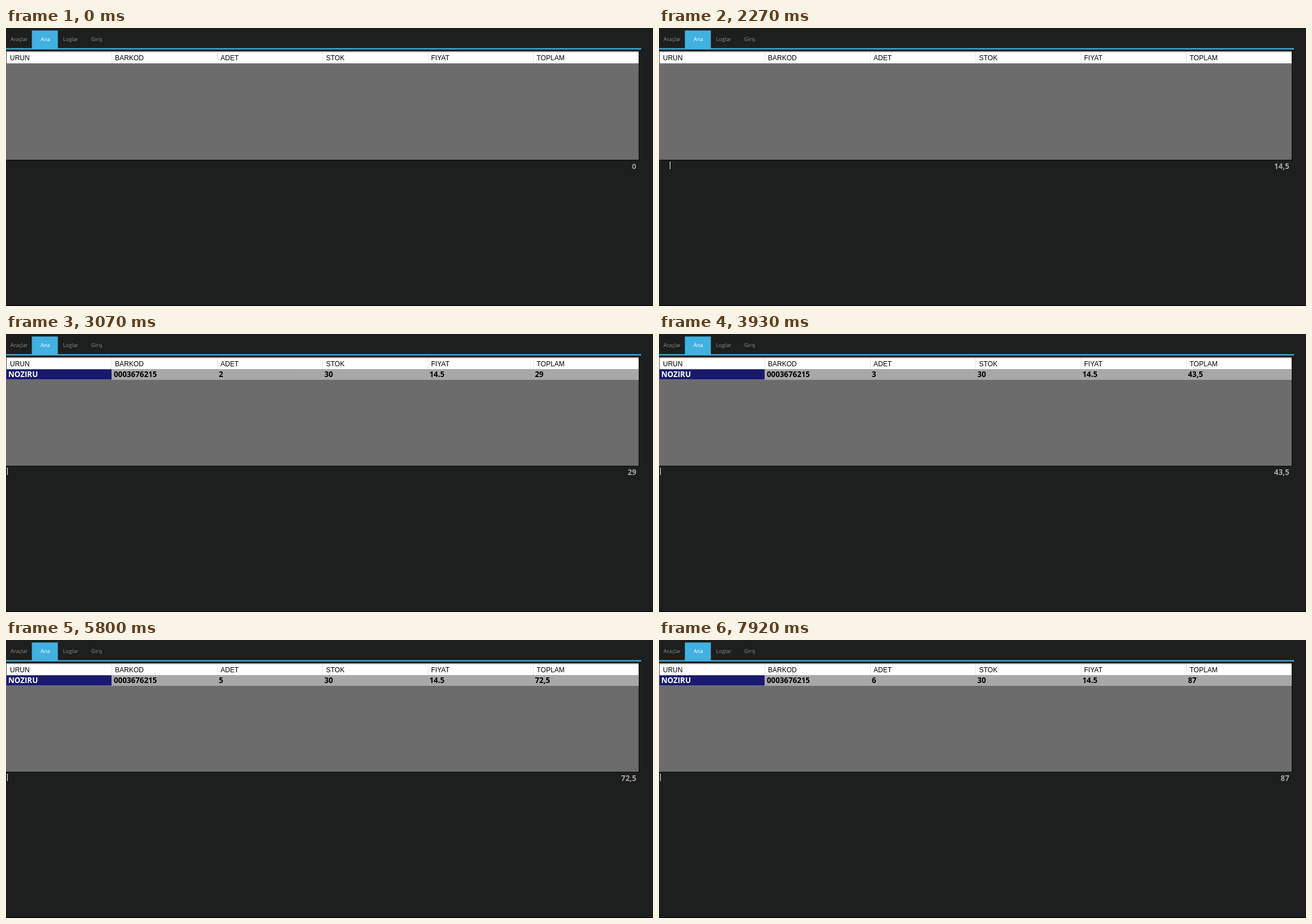
Animation of 1140x491 px, one loop 8000 ms. Source, as an HTML page:

```html
<!DOCTYPE html>
<html lang="tr">
<head>
<meta charset="utf-8">
<title>Satış ekranı</title>
<style>
  html, body { margin: 0; width: 100%; height: 100%; overflow: hidden; background: #1d1f1e; }
  svg { display: block; width: 1140px; height: 491px; }
  text { white-space: pre; font-kerning: none; }
  .tab { font: 9.3px "Open Sans", "Noto Sans", sans-serif; fill: #8c8c8c; }
  .tab.on { fill: #fff; }
  .head { font: 12px "Liberation Sans", Arial, sans-serif; fill: #000; }
  .cell { font: bold 13.3px "Open Sans", "Noto Sans", sans-serif; fill: #000; }
  .cell.on { fill: #fff; }
  .sum { font: bold 13.3px "Open Sans", "Noto Sans", sans-serif; fill: #a6a6a6; text-anchor: end; }
  .sum.zero { font-family: "Liberation Sans", Arial, sans-serif; }
</style>
</head>
<body>
<svg id="stage" viewBox="0 0 1140 491"></svg>
<script>
const LOOP = 8000;
const PRICE = 14.5;
const PITCH = 185.6;
const BLINK = 530;
const FRAME = 66;
const stage = document.getElementById("stage");

function add(tag, attrs, parent = stage) {
  const el = document.createElementNS("http://www.w3.org/2000/svg", tag);
  for (const key in attrs) el.setAttribute(key, attrs[key]);
  return parent.appendChild(el);
}
const rect = (x, y, width, height, fill, parent) => add("rect", { x, y, width, height, fill }, parent);
function label(text, x, y, cls, parent) {
  const el = add("text", { x, y, class: cls }, parent);
  el.textContent = text;
  return el;
}
const columnX = (i, offset) => Math.round(offset + i * PITCH);

// Tab strip
rect(45.6, 4.4, 45.8, 32, "#41b1e1");
rect(0, 35.6, 1119, 2.3, "#41b1e1");
label("Araçlar", 8, 23, "tab");
label("Ana", 61, 23, "tab on");
label("Loglar", 100.5, 23, "tab");
label("Giriş", 150, 23, "tab");

// Grid: dark frame, grey body, bevelled white header
rect(0, 41, 1115.7, 192.8, "#000");
rect(0, 41, 1114.8, 191.8, "#6c6c6c");
rect(0, 41, 1114.8, 1, "#a0a0a0");
rect(1.3, 42.4, 1113.3, 20, "#fff");
["URUN", "BARKOD", "ADET", "STOK", "FIYAT", "TOPLAM"].forEach((name, i) => {
  if (i) rect(columnX(i, 0.6), 43, 1, 19, "#e2e2e2");
  label(name, columnX(i, 6.8), 57, "head");
});
rect(0, 490, 1140, 1, "#000");

// Product row
const row = add("g", {});
rect(1, 62.4, 1113.8, 18.6, "#a8a8a8", row);
rect(1, 62.4, 185, 18, "#191970", row);
const cells = ["NOZIRU", "0003676215", "1", "30", "14.5", "14.5"].map((text, i) =>
  label(text, columnX(i, 4), 76, i ? "cell" : "cell on", row));

const sum = label("0", 1110.5, 249, "sum zero");
const caret = rect(2, 236, 1, 13, "#fff");
const pointer = add("path", {
  d: "M0 0V16L3.7 12.6L6 18L8.4 17L6.1 11.7H11.2Z",
  fill: "#fff", stroke: "#000"
});

// Each scan types a code, updates the total, then refreshes the row
const FOCUS = 335;
const scans = [
  { typed: 1930, total: 2270, lag: 60 },
  { typed: 2870, total: 3070 },
  { typed: 3730, total: 3930 },
  { typed: 4400, total: 4600 },
  { typed: 5600, total: 5800 },
  { typed: 6260, total: 6460, lag: 70 }
].map(({ typed, total, lag = 0 }) => ({ typed, total, done: total + lag }));

// Pointer moves; each stays visible until its end time
const glides = [
  { from: [1006, 415], to: [781, 301], start: 70, time: 400, end: 1870 },
  { from: [798, 306], to: [988, 363], start: 7790, time: 100, end: 7920 }
];

const show = (el, on) => el.setAttribute("visibility", on ? "visible" : "hidden");
const money = n => String(n * PRICE).replace(".", ",");
const easeOut = p => 1 - (1 - p) ** 2;

function drawCaret(t, count) {
  const next = scans[count];
  const typing = Boolean(next) && t >= next.typed;
  const since = t - (count ? scans[count - 1].done : FOCUS);
  caret.setAttribute("x", typing ? 19 : 2);
  show(caret, typing || (since >= 0 && Math.floor(since / BLINK) % 2 === 0));
}

function drawPointer(t) {
  const glide = glides.find(g => t >= g.start && t < g.end);
  show(pointer, Boolean(glide));
  if (!glide) return;
  const { from, to, start, time } = glide;
  const held = Math.floor((t - start) / FRAME) * FRAME;
  const p = easeOut(Math.min(1, held / time));
  const pos = from.map((v, i) => Math.round(v + (to[i] - v) * p));
  pointer.setAttribute("transform", `translate(${pos})`);
}

function draw(t) {
  const count = scans.filter(s => t >= s.done).length;
  show(row, count > 0);
  cells[2].textContent = count;
  cells[5].textContent = count === 1 ? String(PRICE) : money(count);

  const paid = scans.filter(s => t >= s.total).length;
  sum.textContent = money(paid);
  sum.classList.toggle("zero", paid === 0);

  drawCaret(t, count);
  drawPointer(t);
}

const start = performance.now();
function tick() {
  draw((performance.now() - start) % LOOP);
  requestAnimationFrame(tick);
}
tick();
</script>
</body>
</html>
```
